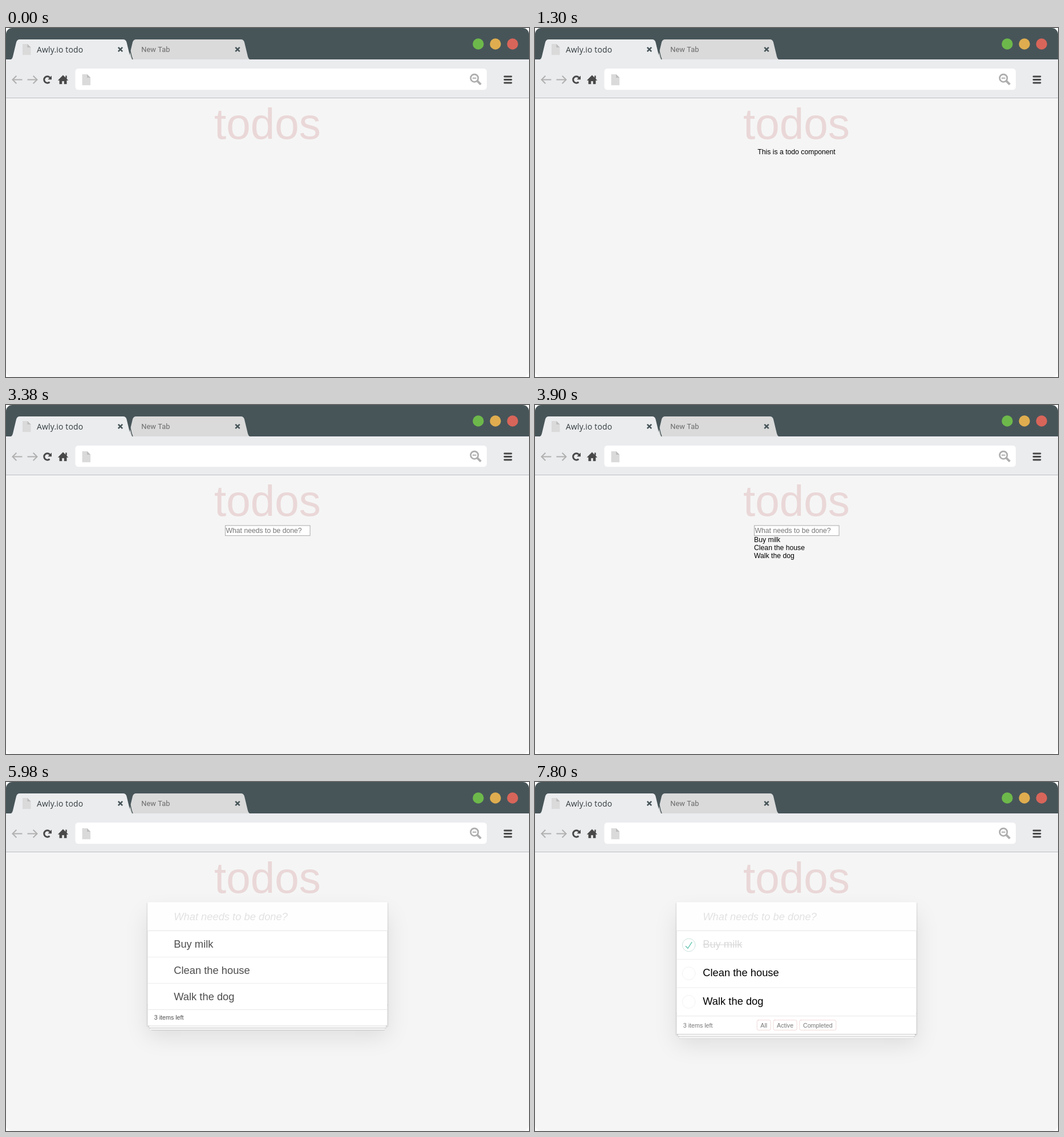
Recreate the animation shown at these times as an HTML page with a canvas. Size 917 px wide and 611 px high, loop 8000 ms.

```html
<!DOCTYPE html>
<html lang="en">
<head>
<meta charset="utf-8">
<title>Todo</title>
<style>
  html, body { margin: 0; width: 100%; height: 100%; overflow: hidden; background: #fff; }
  canvas { display: block; }
</style>
</head>
<body>
<canvas id="stage" width="917" height="611"></canvas>
<script>
const ctx = document.getElementById('stage').getContext('2d');
const W = 917, H = 611;
const K = W / 1200; // the page is laid out 1200 units wide
const LOOP = 8000, STEP = 1300;
const SANS = '"Liberation Sans", Arial, sans-serif';
const BAR = '#475559', CHROME = '#ebecee', PAGE = '#f5f5f5', INK = '#484848';
const ITEMS = ['Buy milk', 'Clean the house', 'Walk the dog'];
const CARD = { x: 248.35, y: 210.6, w: 550 * K, head: 260.2 };

// One entry per styled stage of the list
const CARDS = [
  { row: 46, text: 29.9, done: 0, checks: false, ink: '#4d4d4d', foot: 28.1, footInk: '#4d4d4d', note: 17.6 },
  { row: 56, text: 33, done: 2, checks: true, ink: '#000', foot: 28.1, footInk: '#000', note: 17.6 },
  { row: 49.7, text: 30, done: 1, checks: true, ink: '#000', foot: 31.6, footInk: '#777', note: 20, filters: true },
];

function rect(x, y, w, h, color) {
  ctx.fillStyle = color;
  ctx.fillRect(x, y, w, h);
}

function rounded(x, y, w, h, r) {
  ctx.beginPath();
  ctx.roundRect(x, y, w, h, r);
}

function disc(x, y, r, color) {
  ctx.fillStyle = color;
  ctx.beginPath();
  ctx.arc(x, y, r, 0, Math.PI * 2);
  ctx.fill();
}

function trace(points) {
  ctx.beginPath();
  points.forEach(([x, y]) => ctx.lineTo(x, y));
}

function poly(points, color) {
  trace(points);
  ctx.fillStyle = color;
  ctx.fill();
}

function line(points, color, width, cap = 'butt') {
  trace(points);
  ctx.strokeStyle = color;
  ctx.lineWidth = width;
  ctx.lineCap = cap;
  ctx.stroke();
}

function text(str, x, y, size, color, { family = SANS, style = '', align = 'left', spacing = 0 } = {}) {
  ctx.font = `${style} ${size}px ${family}`;
  ctx.textAlign = align;
  ctx.letterSpacing = spacing + 'px';
  ctx.fillStyle = color;
  ctx.fillText(str, x, y);
}

// Box shadow in layout units, cast by a box outside the stage
function shadow(x, y, w, h, dy, blur, spread, color) {
  const away = 3000, s = spread * K;
  ctx.save();
  ctx.shadowColor = color;
  ctx.shadowBlur = blur * K;
  ctx.shadowOffsetX = away;
  ctx.shadowOffsetY = dy * K;
  rect(x - s - away, y - s, w + 2 * s, h + 2 * s, '#000');
  ctx.restore();
}

function tab(left, right, color) {
  const top = 20, base = 55;
  ctx.beginPath();
  ctx.moveTo(left, base);
  ctx.quadraticCurveTo(left + 2.2, base - 1, left + 3, base - 5);
  ctx.lineTo(left + 9, top + 5);
  ctx.quadraticCurveTo(left + 10.5, top, left + 15, top);
  ctx.lineTo(right - 14, top);
  ctx.quadraticCurveTo(right - 9.5, top, right - 8, top + 5);
  ctx.lineTo(right - 2, base - 5);
  ctx.quadraticCurveTo(right - 1, base - 1, right + 1, base);
  ctx.closePath();
  ctx.fillStyle = color;
  ctx.fill();
}

function cross(x, y) {
  const r = 3.7;
  line([[x - r, y - r], [x + r, y + r]], BAR, 2.6);
  line([[x - r, y + r], [x + r, y - r]], BAR, 2.6);
}

function page(x, y) {
  poly([[x, y], [x + 8.5, y], [x + 14.5, y + 6], [x + 14.5, y + 19.2], [x, y + 19.2]], '#dadada');
  poly([[x + 8.5, y], [x + 14.5, y + 6], [x + 8.5, y + 6]], '#bcbcbc');
}

function arrow(tip, tail) {
  const back = tip + Math.sign(tail - tip) * 6.8, y = 90.5;
  line([[tip, y], [tail, y]], '#b0b0b0', 2);
  line([[back, y - 6.8], [tip, y], [back, y + 6.8]], '#b0b0b0', 2);
}

function drawBrowser() {
  rect(0, 0, W, 56, BAR);
  rect(0, 55, W, 67, CHROME);
  rect(0, 122, W, 1, '#b8bec2');

  tab(213, 426, '#dadada');
  line([[214, 24], [220.2, 50], [222, 55]], BAR, 1.4);
  tab(9, 219.5, CHROME);
  page(29, 28);
  text('Awly.io todo', 54, 42.7, 14, '#333b3e', { family: '"Open Sans", sans-serif', spacing: 0.15 });
  text('New Tab', 237.3, 42.2, 12.9, '#6b6b6b', { family: 'Roboto, sans-serif' });
  cross(200.5, 37.5);
  cross(406, 37.5);
  ['#6db84b', '#dfad4f', '#d8655a'].forEach((c, i) => disc(828 + 30.1 * i, 28, 9.7, c));

  arrow(11.5, 28.5);
  arrow(54.5, 37.5);
  ctx.strokeStyle = INK;
  ctx.lineWidth = 3;
  ctx.beginPath();
  ctx.arc(72.5, 90.5, 5.7, 0.8, Math.PI * 2 - 0.6);
  ctx.stroke();
  poly([[80, 83.5], [80, 90.2], [73.5, 90.2]], INK);

  poly([[100, 82.5], [109.3, 91.7], [90.8, 91.7]], INK);
  rect(104.3, 83.5, 2.4, 5, INK);
  rect(93.6, 91, 4.7, 7.2, INK);
  rect(101.8, 91, 4.7, 7.2, INK);
  rect(98, 90.5, 4, 2.6, INK);

  rounded(121.5, 71, 721.5, 37.3, 5.5);
  ctx.fillStyle = '#fff';
  ctx.fill();
  page(133.6, 81);

  ctx.strokeStyle = '#adadad';
  ctx.lineWidth = 2.7;
  ctx.beginPath();
  ctx.arc(821.3, 87.7, 6.6, 0, Math.PI * 2);
  ctx.stroke();
  line([[818, 87.7], [824.6, 87.7]], '#adadad', 2);
  line([[826.3, 92.7], [832.5, 98.9]], '#adadad', 3.8);
  [85, 90.5, 96].forEach(y => line([[874, y], [886, y]], INK, 2.9, 'round'));
}

function drawPlain(step) {
  const size = 16 * K;
  if (step === 1) text('This is a todo component', W / 2, 221.3, size, '#000', { align: 'center' });
  if (step < 2) return;
  rect(384, 210.6, 149.6, 18.6, '#a9a9a9');
  rect(385, 211.6, 147.6, 16.6, '#fff');
  text('What needs to be done?', 385.5, 223.8, size, '#757575');
  if (step === 3) ITEMS.forEach((item, i) => text(item, 384, 240 + 18 * K * i, size, '#000'));
}

function drawCheck(x, y, done) {
  const s = 40 / 135 * K;
  ctx.strokeStyle = done ? '#bddad5' : '#ededed';
  ctx.lineWidth = 3 * s + 0.1;
  ctx.beginPath();
  ctx.arc(x, y, 50 * s, 0, Math.PI * 2);
  ctx.stroke();
  if (!done) return;
  const tick = [[22, -25], [-8, 21], [-23, 6], [-27, 10], [-7, 30], [27, -22]];
  poly(tick.map(([px, py]) => [x + px * s, y + py * s]), '#5dc2af');
}

function drawFilters(y, base) {
  [['All', 389.3, 24], ['Active', 418, 41.2], ['Completed', 463.8, 64]].forEach(([label, x, w]) => {
    rounded(x, y, w, 17.6, 2.5);
    ctx.strokeStyle = 'rgba(175,47,47,.2)';
    ctx.lineWidth = 0.9;
    ctx.stroke();
    text(label, x + w / 2, base, 14 * K, '#777', { align: 'center' });
  });
}

function drawCard(card) {
  const { x, y, w, head } = CARD;
  const footTop = head + 3 * card.row + 0.3;
  const bottom = footTop + card.foot;
  const size = 24 * K;

  shadow(x, y, w, bottom - y, 25, 50, 0, 'rgba(0,0,0,.1)');
  shadow(x, y, w, bottom - y, 2, 4, 0, 'rgba(0,0,0,.2)');
  const stack = (...cast) => shadow(x, bottom - 50 * K, w, 50 * K, ...cast);
  stack(17, 2, -6, 'rgba(0,0,0,.2)');
  stack(16, 0, -6, '#f6f6f6');
  stack(9, 1, -3, 'rgba(0,0,0,.2)');
  stack(8, 0, -3, '#f6f6f6');
  stack(1, 1, 0, 'rgba(0,0,0,.2)');

  rect(x, y, w, bottom - y, '#fff');
  rect(x, y, w, head - y, '#fefefe');
  rect(x, head - 1.4, w, 1.4, '#f7f7f7');
  rect(x, head, w, 0.9, '#e6e6e6');
  text('What needs to be done?', 294.2, 241.9, size, '#e2e2e2', { style: 'italic' });

  ITEMS.forEach((item, i) => {
    const top = head + card.row * i, base = top + card.text;
    const done = i < card.done;
    text(item, 294.2, base, size, done ? '#d9d9d9' : card.ink);
    if (done) rect(294.2, base - 5.8, ctx.measureText(item).width, 1.1, '#d9d9d9');
    if (card.checks) drawCheck(269.7, top + card.row / 2 + 0.4, done);
    if (i < 2) rect(x, top + card.row, w, 0.8, '#e9e9e9');
  });

  rect(x, footTop - 0.3, w, 0.9, '#e4e4e4');
  text('3 items left', 259.8, footTop + card.note, 14 * K, card.footInk);
  if (card.filters) drawFilters(footTop + 7.2, footTop + card.note);
}

function draw(time) {
  const step = Math.floor(time / STEP);
  rect(0, 0, W, H, '#fff');
  ctx.save();
  rounded(0, 0, W, H, 11);
  ctx.clip();
  rect(0, 0, W, H, PAGE);
  drawBrowser();
  text('todos', W / 2, 193.6, 100 * K, 'rgba(175,47,47,.15)', { align: 'center' });
  if (step < 4) drawPlain(step);
  else drawCard(CARDS[step - 4]);
  ctx.restore();
}

function tick() {
  draw(performance.now() % LOOP);
  requestAnimationFrame(tick);
}
tick();
</script>
</body>
</html>
```
